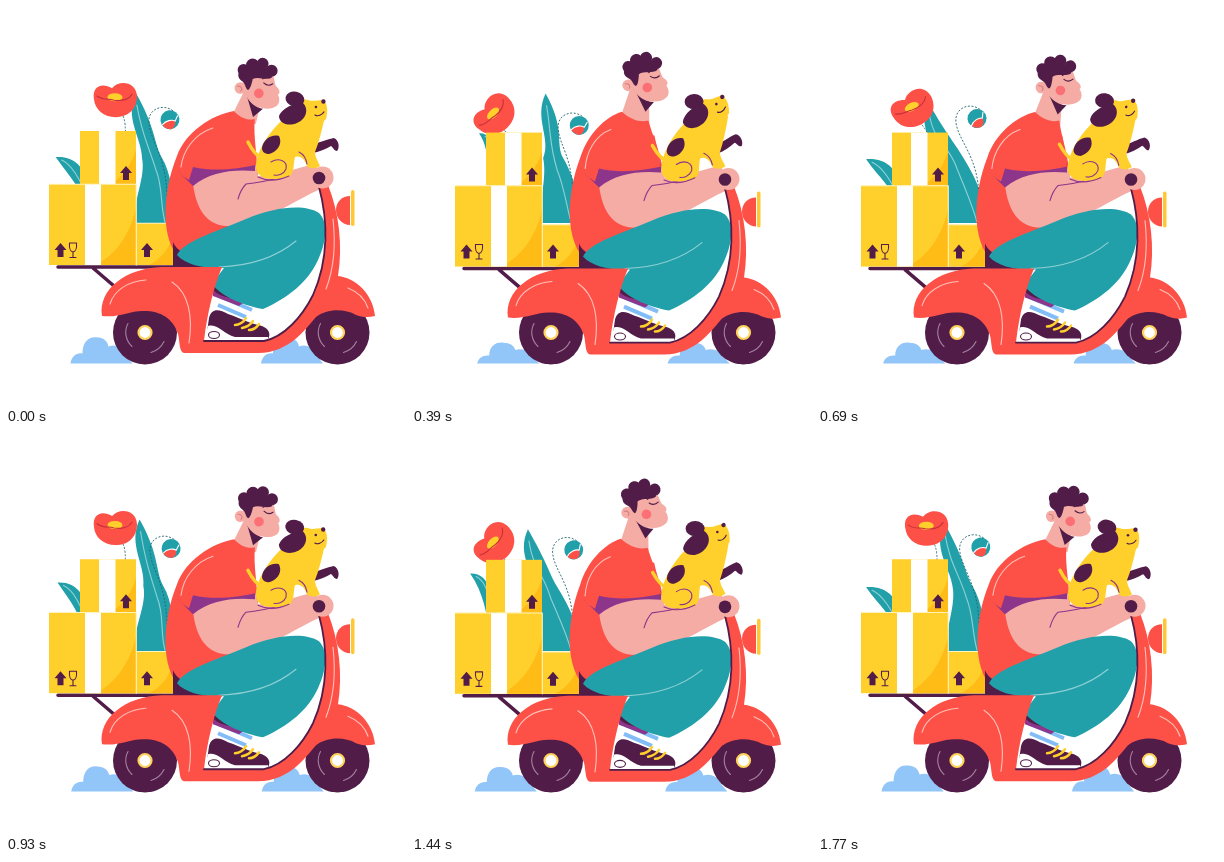
These frames come from a looping animation (400x400 px, 1.8 s). An HTML page:

```html
<!DOCTYPE html>
<html lang="en">
<head>
<meta charset="utf-8">
<title>Scooter delivery</title>
<style>
html, body { margin: 0; width: 100%; height: 100%; overflow: hidden; background: #fff; }
svg { display: block; width: 100vw; height: 100vh; }
.red { fill: #fd5148; } .teal { fill: #22a0aa; } .skin { fill: #f4aca5; }
.dark { fill: #511d48; } .plum { fill: #8d348b; } .yel { fill: #ffd02c; }
.amber { fill: #ffbb16; } .sky { fill: #92c5f8; } .white { fill: #fff; }
.line { fill: none; stroke-width: 1.1; stroke-linecap: round; stroke-linejoin: round; }
.ink { stroke: #511d48; } .pink { stroke: #ffc0b7; } .pale { stroke: #8fd0d4; }
.violet { stroke: #8d348b; } .gold { stroke: #ffd02c; }
.stem { fill: none; stroke: #25656d; stroke-width: .9; stroke-dasharray: 2 1.6; }
</style>
</head>
<body>
<svg viewBox="0 0 400 400">
  <defs>
    <path id="arrow" class="dark" d="M0-7 L6 0 H3 V7 H-3 V0 H-6Z"/>
    <path id="cloud" class="sky" d="M0 0 C1-7 6-11 12-10 C12-21 18-27 26-26 C33-26 37-22 38-17 C46-20 53-15 55-9 L62 0Z"/>
    <g id="wheel">
      <circle class="dark" r="32"/>
      <path class="line" stroke="#a6819e" d="M-17-9 A19 19 0 0 0-13 14 M6 20 A21 21 0 0 0 19 9"/>
      <circle class="white" r="6.5" stroke="#ffd25a" stroke-width="2.2"/>
    </g>
  </defs>

  <use id="cloudL" href="#cloud"/>
  <use id="cloudR" href="#cloud"/>

  <path id="leafL" class="teal"/>
  <path id="ribL" class="line pale"/>
  <path id="leafR" class="teal"/>
  <path id="ribR" class="line pale"/>
  <path id="budStem" class="stem"/>
  <g id="bud">
    <circle class="teal" r="9.5"/>
    <path class="red" d="M-8 4 C-4 0 2 0 5 2 C5 7 2 9 0 9.500 C-4 9-7 7-8 4Z"/>
    <path class="line" stroke="#fff" d="M-8 4 C-4 0 2 0 5 2 L8-3"/>
  </g>
  <path id="bloomStem" class="stem"/>
  <g id="bloom">
    <path class="red" d="M-21-2 C-23-14-14-19-3-13 C3-21 21-21 22-5 C22 9 12 16 1 16 C-12 16-20 8-21-2Z"/>
    <ellipse class="yel" cy="-4" rx="7.500" ry="4"/>
    <path class="line" stroke="#c6303a" d="M-18-5 C-11 0-7-3-1-1 C6 0 13-1 17-7"/>
  </g>

  <use href="#wheel" x="139" y="326.500"/>
  <use href="#wheel" x="331.500" y="326.500"/>

  <g id="ride">
    <path class="line ink" style="stroke-width:3.500" d="M52 261 H214 M87 262 L108 280"/>
    <rect class="yel" x="74" y="125" width="56" height="53"/>
    <path class="amber" d="M130 144 C125 160 116 171 105 178 H130Z"/>
    <rect class="white" x="93" y="125" width="16.500" height="53"/>
    <use href="#arrow" x="120" y="167"/>
    <rect class="yel" x="43" y="178" width="87" height="81"/>
    <path class="amber" d="M130 202 C124 229 109 249 90 259 H130Z"/>
    <rect class="white" x="79" y="178" width="16" height="81"/>
    <use href="#arrow" x="54.500" y="244"/>
    <path class="line ink" d="M63.500 237 H70.500 C71 243 70 245 67 246 C64 245 63 243 63.500 237Z M67 246 V251 M64 251.500 H70"/>
    <rect class="yel" x="130" y="217" width="37" height="42"/>
    <path class="amber" d="M167 230 C162 245 153 254 143 259 H167Z"/>
    <use href="#arrow" x="141" y="244"/>
    <path class="line" stroke="#fff3c0" d="M43 178.200 H130.300 V259 M130 217.200 H167"/>

    <path id="neck" class="skin"/>
    <g id="head">
      <path class="dark" d="M241 90 C244 97 250 102 257 103 L247 111Z"/>
      <path class="skin" d="M237 70 L267 68 C269 74 269 77 270 80 C274 84 275 87 272 89 C274 92 274 97 271 100 C263 106 249 102 243 94 L237 86Z"/>
      <circle class="skin" cx="234.500" cy="82" r="5.800"/>
      <path class="line" stroke="#d67c83" d="M232 80 C236 80 237 83 235 85"/>
      <circle cx="253" cy="87.500" r="4.800" fill="#fb6f75"/>
      <g class="dark">
        <path d="M236 63 C246 58 258 59 267 66 L266 72 C260 75 253 70 247 73 C246 78 244 84 242 84 C239 82 240 77 236 75 C231 71 232 66 236 63Z"/>
        <circle cx="238" cy="64" r="6"/><circle cx="247" cy="59" r="6.500"/>
        <circle cx="257" cy="58" r="6"/><circle cx="266" cy="65" r="6"/>
      </g>
      <path class="line ink" d="M258 77 C261 80 264 80 267 78 M257 73 C260 71 262 71 264 72"/>
    </g>
    <path id="shirt" class="red"/>
    <path class="dark" d="M167 236 C172 248 190 254 222 261 H167Z"/>
    <path class="skin" d="M186 166 L249 158 L252 170 C272 170 291 162 308 158 L322 180 C294 190 262 216 228 220 C202 222 188 206 186 166Z"/>
    <path class="line violet" d="M232 193 C234 186 237 181 240 178 C252 177 265 174 276 171"/>
    <path class="plum" d="M172 165 L186 158 L249 156 L249 165 C226 163 204 166 187 180Z"/>
    <path id="sleeve" class="red"/>
    <path id="fold" class="line pink"/>

    <path class="white" d="M212 286 L248 302 L237 316 L211 303Z"/>
    <path class="line" style="stroke-linecap:butt;stroke-width:4" stroke="#82bdf7" d="M213 290 L246 304 M212 299 L240 311"/>
    <path class="plum" d="M206 277 L241 294 L233 300 L207 290Z"/>
    <path class="dark" d="M206 275 L240 291 C226 294 213 291 206 283Z"/>
    <path class="teal" d="M171 249 C178 235 207 227 240 213 C270 200 300 198 313 207 C323 217 320 237 312 254 C302 276 282 292 257 303 C240 300 217 292 206 278 L218 262 C198 263 180 259 171 249Z"/>
    <path class="line pale" d="M213 261 C242 260 268 253 290 235"/>

    <path class="dark" d="M203 312 C206 301 214 304 222 308 C236 313 246 318 256 320 C263 323 265 328 262 333 H200Z"/>
    <path class="white" d="M198 335 L202 320 C212 317 217 328 229 331 L262 331 V335Z"/>
    <ellipse class="line ink" cx="208" cy="329" rx="5.500" ry="3.500"/>
    <path class="line gold" style="stroke-width:2.500" d="M229 319 C233 319 238 316 240 312 M236 322 C241 321 245 318 247 315 M243 324 C248 324 251 321 253 318"/>

    <path class="red" d="M96 310 C92 284 119 262 156 261 H216 C208 280 201 308 198 335 H258 C278 331 296 311 307 289 C323 253 322 214 313 181 L322 179 C333 206 337 240 332 270 C350 272 367 288 369 310 C362 312 355 311 350 309 C338 302 320 303 310 311 C300 322 284 347 252 347 H178 C173 346 174 336 172 328 C167 311 152 304 136 305 C124 305 112 312 96 310Z"/>
    <path class="line ink" style="stroke-width:1.800" d="M198 335 H258 C278 331 296 311 307 289 C323 253 322 214 313 181"/>
    <path class="line pink" d="M104 298 C108 284 123 275 140 274 M183 337 C187 311 183 287 166 276 M327 213 C330 240 327 265 320 283 M342 282 C352 286 359 293 362 302"/>
    <path class="red" d="M344 190 V219 C336 219 330 212 330 204 C330 196 336 190 344 190Z"/>
    <rect x="345" y="184" width="3.500" height="36" rx="1.700" fill="#ffc832"/>

    <g id="dog">
      <path class="line gold" style="stroke-width:3.500" d="M242 136 C246 144 250 150 257 153"/>
      <path id="paw" class="dark" d="M306 138 C314 137 321 133 328 132 C333 134 334 142 331 145 C328 145 327 141 325 140 C320 143 313 146 306 147Z"/>
      <path class="yel" d="M280 111 C266 122 252 142 250 158 C248 172 263 176 283 171 C289 166 287 158 289 151 C295 149 299 154 301 160 C304 163 310 163 314 160 C312 155 309 151 309 146 C313 136 316 124 319 110Z"/>
      <path class="dark" d="M256 142 C257 134 265 128 273 130 C277 138 271 146 263 148 C259 148 256 146 256 142Z"/>
      <path class="line violet" d="M265 156 C273 151 282 155 280 163 C278 168 272 170 268 169 M252 171 C262 176 274 174 283 170 M301 158 C300 151 297 148 293 146"/>
      <g id="dogHead">
        <path class="yel" d="M284 108 C284 97 293 91 302 94 C307 96 311 94 317 94 C322 97 322 106 320 113 C314 120 300 122 290 119Z"/>
        <ellipse class="dark" cx="289" cy="93" rx="9.500" ry="7.500" transform="rotate(12 289 93)"/>
        <path class="dark" d="M297 97 C304 104 299 114 291 117 C282 121 273 117 273 110 C276 102 288 97 297 97Z"/>
        <circle class="dark" cx="317.500" cy="95.500" r="2.200"/>
        <circle class="dark" cx="310" cy="101" r="1.300"/>
        <path class="line ink" d="M309 109 C312 111 316 109 318 106"/>
      </g>
    </g>
    <circle class="skin" cx="316.500" cy="171.500" r="11"/>
    <circle class="dark" cx="313" cy="172" r="6.300"/>
  </g>
</svg>
<script>
const LOOP = 1800, SWAY = 900, SHAKE = 300, STEP = 30;
const el = id => document.getElementById(id);
const path = (id, d) => el(id).setAttribute('d', d);
const move = (id, t) => el(id).setAttribute('transform', t);

function draw(t) {
  // cosine that reaches its maximum at the given moment
  const wave = (peak, period = SWAY) => Math.cos((t - peak) / period * 2 * Math.PI);
  const lean = (1 - wave(30)) / 2;

  move('ride', `translate(0 ${1.2 - 1.2 * wave(0, SHAKE)})`);

  const hx = -21 * lean, hy = -8 * lean;
  move('head', `translate(${hx} ${hy}) rotate(${-6 * (1 - wave(60))} 252 80)`);
  path('neck', `M${238 + hx} ${86 + hy} L${256 + hx} ${92 + hy} L${250 - 14 * lean} 118 L${225 - 19 * lean} 112Z`);
  path('shirt', `M${228 - 20 * lean} ${105 - lean} C${235 - 18 * lean} 112 ${242 - 16 * lean} 115 ${249 - 14 * lean} 113
    C${247 - 6 * lean} 132 252 150 252 178 L248 212 L175 254 C${154 - 2 * lean} 234 ${156 - 2 * lean} 187 ${171 - 3 * lean} 150
    C${179 - 4 * lean} 127 ${205 - 13 * lean} 109 ${228 - 20 * lean} ${105 - lean}Z`);
  path('sleeve', `M${176 - 3 * lean} 141 L172 165 C176 170 180 172 183 174 L187 161 C208 166 232 163 249 159
    L${247 - 5 * lean} 128 L${205 - 8 * lean} 118Z`);
  path('fold', `M${175 - 2 * lean} 161 C${177 - 3 * lean} 145 ${188 - 6 * lean} 128 ${207 - 9 * lean} 122`);

  const perk = (1 - wave(-30)) / 2;
  move('dog', `rotate(${-2.6 * perk} 285 172)`);
  move('dogHead', `rotate(${-12 * perk} 292 110)`);
  move('paw', `rotate(${-10 * perk} 306 143)`);

  const fx = 95.5 + 13.5 * wave(15), fy = 103.5 - 8.5 * wave(30);
  move('bloom', `translate(${fx} ${fy}) rotate(${-24 + 25 * wave(30)})`);
  path('bloomStem', `M${fx + 6} ${fy + 12} Q${fx + 13} ${fy + 18} 118 145`);

  const bx = 164.5 + 5.5 * wave(240), by = 116 + 4 * wave(310);
  move('bud', `translate(${bx} ${by}) rotate(${-8 + 18 * wave(220)})`);
  path('budStem', `M${bx + 3} ${by - 9} C${bx - 8} ${by - 17} ${bx - 23} ${by - 10} ${bx - 21} ${by + 4}
    C${bx - 19} ${by + 22} 160 150 161 190`);

  const rx = 128 + 18 * wave(210), ry = 89 - 8 * wave(190), mid = 152 + 8 * wave(150);
  path('leafR', `M${rx} ${ry} C${rx - 12} ${ry + 25} ${rx + 6} ${ry + 45} ${mid - 20} 152 C${mid - 16} 172 127 192 129 217 H167
    C168 190 ${mid + 9} 167 ${mid} 152 C${mid - 8} 138 ${rx + 20} ${ry + 35} ${rx} ${ry}Z`);
  path('ribR', `M${rx + 1} ${ry + 12} C${rx + 6} ${ry + 42} ${mid - 14} 138 ${mid - 6} 164 C${mid + 1} 181 154 198 159 216`);

  const lift = wave(330), lx = 57 + 11 * lift, ly = 141 - 15 * lift;
  path('leafL', `M${lx} ${ly} C${lx + 19} ${ly - 1} 80 159 92 200 H79 C74 180 ${lx + 14} ${ly + 20} ${lx} ${ly}Z`);
  path('ribL', `M${lx + 6} ${ly + 3} Q${lx + 20} ${ly + 9} 83 196`);

  const drift = 64 + 1.5 * wave(60, SHAKE), puff = .87 + .14 * wave(290, SHAKE);
  move('cloudL', `translate(${drift} 357.500) scale(1 ${puff})`);
  move('cloudR', `translate(${drift + 190.5} 357.500) scale(1 ${puff})`);
}

const start = performance.now();
function tick(now) {
  const t = Math.max(0, now - start) % LOOP;
  draw(Math.floor(t / STEP) * STEP);
  requestAnimationFrame(tick);
}
draw(0);
requestAnimationFrame(tick);
</script>
</body>
</html>
```
